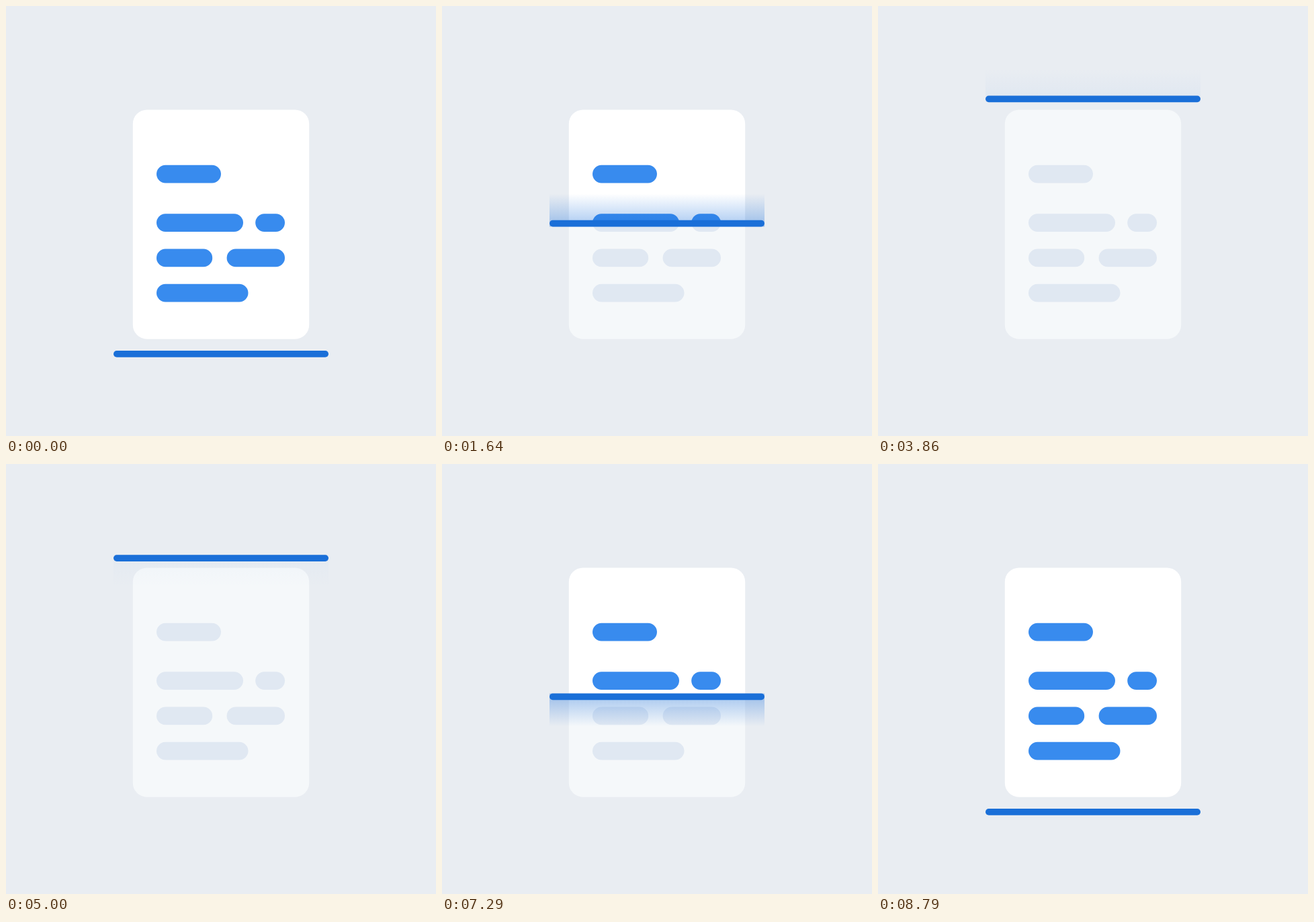
An HTML page that plays this animation: 640 px wide and 640 px high, repeating every 9070 ms.

```html
<!DOCTYPE html>
<html lang="en">
<head>
<meta charset="utf-8">
<title>Document scan</title>
<style>
  html, body { margin: 0; width: 100%; height: 100%; overflow: hidden; background: #e9edf2; }
  svg { display: block; width: 100%; height: 100%; }
</style>
</head>
<body>
<svg viewBox="0 0 640 640">
  <defs>
    <linearGradient id="glow" x1="0" y1="0" x2="0" y2="1">
      <stop offset="0" stop-color="#1a6fdb" stop-opacity="0"/>
      <stop offset="1" stop-color="#1a6fdb" stop-opacity=".38"/>
    </linearGradient>
    <clipPath id="above"><rect id="aboveRect" width="640" height="518"/></clipPath>
    <clipPath id="below"><rect id="belowRect" y="518" width="640" height="640"/></clipPath>
    <rect id="page" x="188.8" y="154.4" width="262.4" height="341.3" rx="21"/>
    <g id="rows"></g>
  </defs>
  <g clip-path="url(#below)">
    <use href="#page" fill="#f5f8fa"/>
    <use href="#rows" fill="#e0e8f2"/>
  </g>
  <g clip-path="url(#above)">
    <use href="#page" fill="#fff"/>
    <use href="#rows" fill="#388bee"/>
  </g>
  <rect id="trail" x="160" y="-44" width="320" height="48.8" fill="url(#glow)"/>
  <rect id="line" x="160" y="-4.8" width="320" height="9.6" rx="4.8" fill="#1a6fd8"/>
</svg>
<script>
const LOOP = 9070, FRAMES = 127;
const BOTTOM = 517.9, TOP = 133.9;
const byId = id => document.getElementById(id);

// x, y, width of each text bar
const bars = [
  [224, 236.8, 96],
  [224, 309.3, 129], [371.2, 309.3, 43.8],
  [224, 361.6, 83.2], [328.6, 361.6, 86.4],
  [224, 413.8, 136.5]
];
byId('rows').innerHTML = bars.map(([x, y, w]) =>
  `<rect x="${x}" y="${y}" width="${w}" height="26.6" rx="13.3"/>`).join('');

const clamp = v => Math.min(1, Math.max(0, v));
const smooth = s => s * s * (3 - 2 * s);
const ramp = (t, from, to) => smooth(clamp((t - from) / (to - from)));

// Value of cubic-bezier(x1, 0, x2, 1) at u, solved by bisection
function ease(u, x1, x2) {
  u = clamp(u);
  let low = 0, high = 1;
  for (let i = 0; i < 30; i++) {
    const s = (low + high) / 2, r = 1 - s;
    if (3 * x1 * s * r * r + 3 * x2 * s * s * r + s * s * s < u) low = s;
    else high = s;
  }
  return smooth((low + high) / 2);
}

function draw(t) {
  const rising = t < 4425;
  const height = rising
    ? ease(t / 4350, .295, .37)
    : 1 - ease((t - 4425) / 4365, .62, .717);
  const y = BOTTOM + (TOP - BOTTOM) * height;
  const glow = rising
    ? ramp(t, 0, 1150) * (1 - ramp(t, 2850, 4150))
    : ramp(t, 4720, 6450) * (1 - ramp(t, 7550, 8700));

  byId('aboveRect').setAttribute('height', y);
  byId('belowRect').setAttribute('y', y);
  byId('line').setAttribute('transform', `translate(0 ${y})`);
  byId('trail').setAttribute('transform', `translate(0 ${y}) scale(1 ${rising ? 1 : -1})`);
  byId('trail').setAttribute('opacity', glow);
}

function tick() {
  const step = LOOP / FRAMES;
  const frame = Math.floor((performance.now() % LOOP) / step + .1) % FRAMES;
  draw(frame * step);
  requestAnimationFrame(tick);
}
tick();
</script>
</body>
</html>
```
